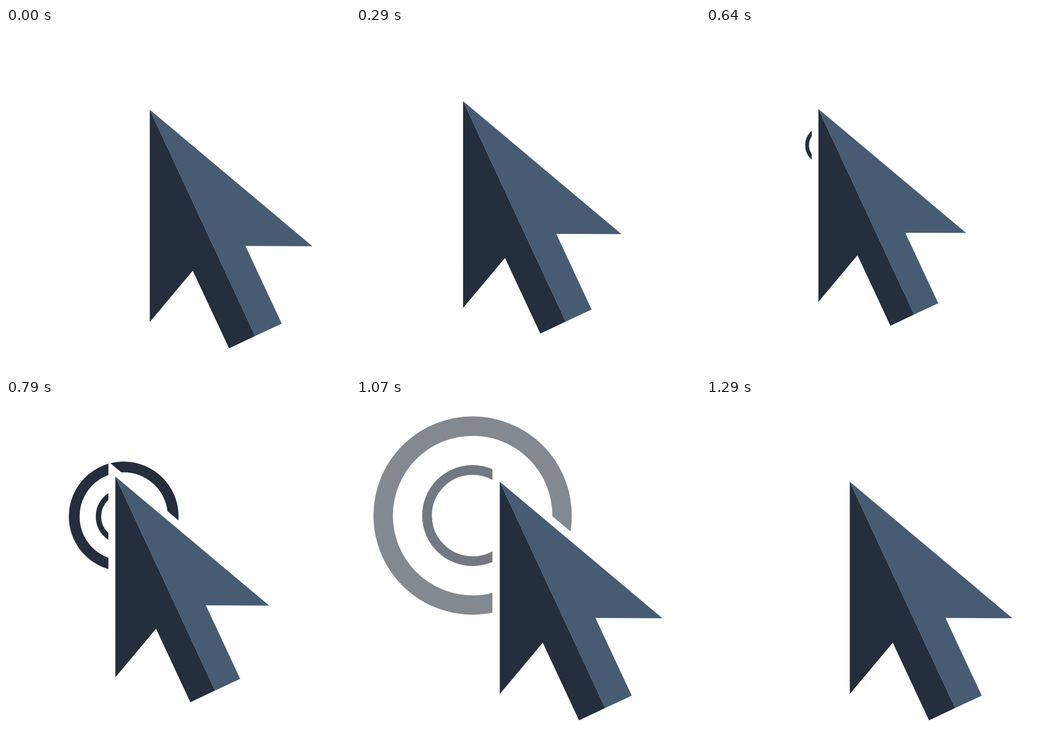
Animation, 640 px wide and 640 px high, one loop 2.43 s. Source, as an HTML page:

```html
<!DOCTYPE html>
<html lang="en">
<head>
<meta charset="utf-8">
<title>Cursor click</title>
<style>
  html, body { margin: 0; width: 100%; height: 100%; overflow: hidden; background: #fff; }
  svg { display: block; width: 100vw; height: 100vh; }
  .ring { fill: none; stroke: #242e3c; }
  .gap { fill: #fff; stroke: #fff; stroke-width: 27.4; stroke-linejoin: miter; }
</style>
</head>
<body>
<svg viewBox="0 0 640 640">
  <g id="rings">
    <circle class="ring" id="outer" r=".9022" stroke-width=".1957"/>
    <circle class="ring" id="inner" r=".46" stroke-width=".098"/>
  </g>
  <g id="cursor">
    <path class="gap" d="M0 0V395L80 299.5L147.5 444L245.5 398L178 253.5L302.5 254Z"/>
    <path fill="#242e3c" d="M0 0V395L80 299.5L147.5 444L196 421Z"/>
    <path fill="#475b73" d="M0 0L196 421L245.5 398L178 253.5L302.5 254Z"/>
  </g>
</svg>
<script>
const LOOP = 2430, FPS = 14, LAST = 18;
const REST = [267.5, 152], HIT = [195.3, 130.3];
const PIVOT = [151, 222];
const EASE = [0, .22, .56, .84, 1];
const PRESS_START = 4;
const PRESS = [.974, .942, .915, .904, .9, .908, .924, .946, .976];

const el = id => document.getElementById(id);
const rings = el('rings'), outer = el('outer'), inner = el('inner'), cursor = el('cursor');
const clamp = v => Math.max(0, Math.min(1, v));
const ease = step => EASE[Math.max(0, Math.min(4, step))];
const bend = (a, c, b, u) =>
  a.map((v, i) => (1 - u) ** 2 * v + 2 * u * (1 - u) * c[i] + u * u * b[i]);

// The motion runs in steps of 1/14 s, on a 10 ms clock.
function stepAt(t) {
  let k = 0;
  while (k < LAST && Math.round((k + 1) * 100 / FPS) * 10 <= t) k++;
  return k;
}

function drawCursor(k) {
  const pos = k < 11
    ? bend(REST, [225, 170], HIT, ease(k))
    : bend(HIT, [255.3, 142.2], REST, ease(k - 11));
  const s = PRESS[k - PRESS_START] ?? 1;
  const [x, y] = pos.map((v, i) => v + PIVOT[i] * (1 - s));
  cursor.setAttribute('transform', `translate(${x} ${y}) scale(${s})`);
}

function drawRings(k) {
  const on = k > 8 && k < LAST;
  rings.style.display = on ? '' : 'none';
  if (!on) return;
  const p = (k - 8) / 10;
  const r = 206 * (1 - (1 - p) ** 2) - (k < 16 ? 3 : 0);
  rings.setAttribute('transform',
    `translate(${221.5 - .0245 * r} ${218.7 - .02 * r}) scale(${r})`);
  outer.style.opacity = clamp(.565 - .1725 * (k - 15));
  inner.style.opacity = clamp(.64 - .17 * (k - 15));
}

let shown = -1;
const start = performance.now();
function tick() {
  const k = stepAt((performance.now() - start) % LOOP);
  if (k !== shown) {
    shown = k;
    drawCursor(k);
    drawRings(k);
  }
  requestAnimationFrame(tick);
}
tick();
</script>
</body>
</html>
```
